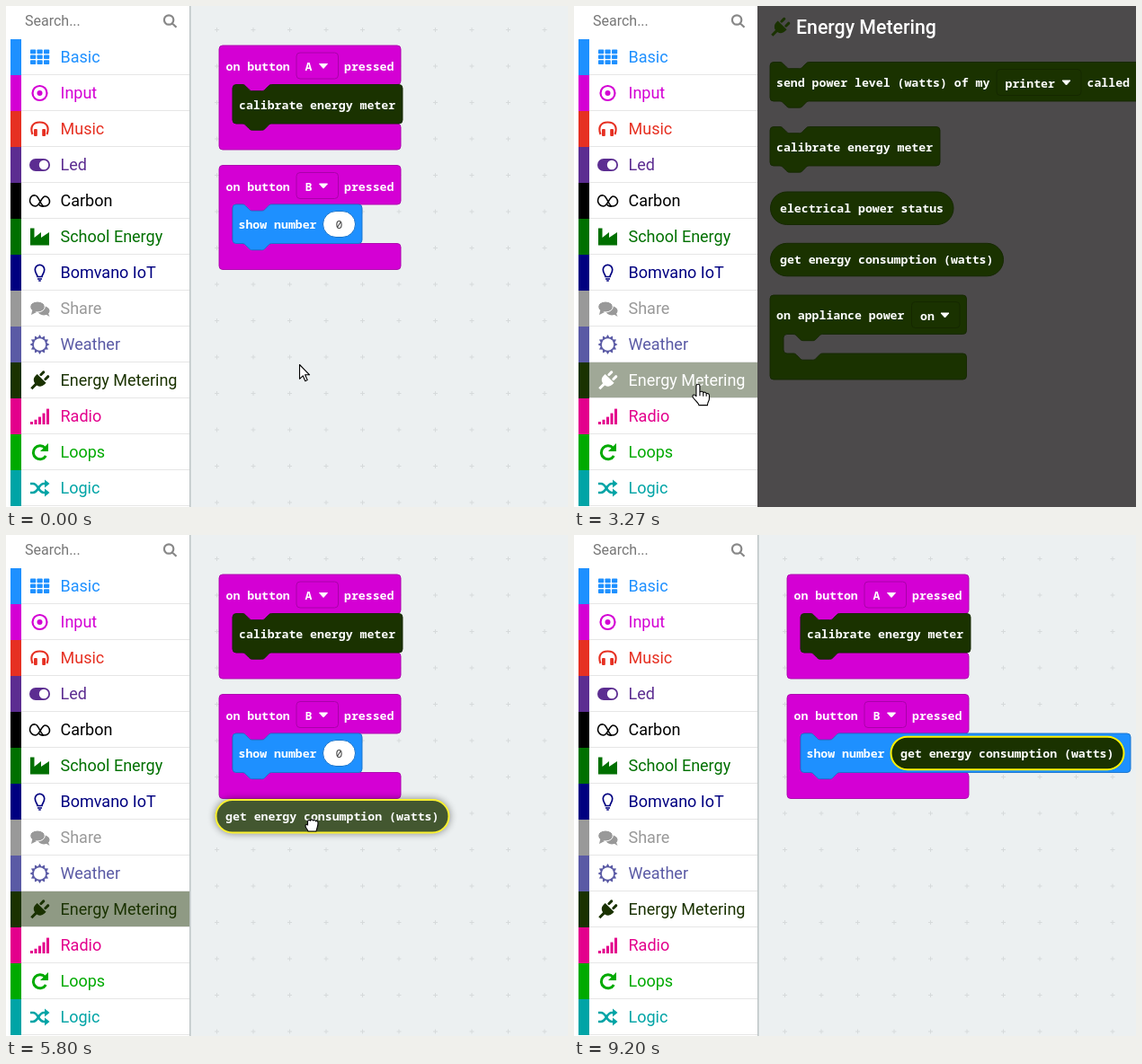
Write an HTML page that moves like this. It is 625 by 558 pixels and loops after 9.74 s.

```html
<!DOCTYPE html>
<html lang="en">
<head>
<meta charset="utf-8">
<title>Block editor</title>
<style>
  html, body { margin: 0; width: 100%; height: 100%; overflow: hidden; background: #ecf0f1; }
  svg { display: block; width: 625px; height: 558px; }
  text { font-family: Roboto, sans-serif; white-space: pre; }
  .code { font: bold 13.2px "Noto Sans Mono", monospace; fill: #fff; }
  .row { font-size: 18px; fill: currentColor; }
  .line { fill: none; stroke: currentColor; }
  .tip { font: 11.25px "Open Sans", sans-serif; fill: #777; }
  .cursor path { fill: #fff; stroke: #000; stroke-width: 1.1; stroke-linejoin: round; }
  #drag { opacity: .8; filter: drop-shadow(0 0 4px rgba(0, 0, 0, .55)); }
</style>
</head>
<body>
<svg id="stage" viewBox="0 0 625 558"></svg>
<script>
const LOOP = 9740, FRAME = 1000 / 15;
const MAGENTA = ['#d400d4', '#aa00aa'], BLUE = ['#1e90ff', '#1873cc'], GREEN = ['#1a3200', '#152800'];
const YELLOW = '#fff200';
const BAR = 43.5;

// Block shapes
const notch = d => `c${1.8 * d},0 ${2.7 * d},.9 ${3.6 * d},1.8l${3.6 * d},3.6` +
  `c${.9 * d},.9 ${1.8 * d},1.8 ${3.6 * d},1.8h${10.8 * d}` +
  `c${1.8 * d},0 ${2.7 * d},-.9 ${3.6 * d},-1.8l${3.6 * d},-3.6` +
  `c${.9 * d},-.9 ${1.8 * d},-1.8 ${3.6 * d},-1.8`;
const arc = (x, y, sweep = 1) => `a4,4 0 0 ${sweep} ${x},${y}`;
const shape = (d, [fill, edge]) => `<path d="${d}" fill="${fill}" stroke="${edge}" stroke-width=".9"/>`;

const statement = (x, y, w, color) => shape(
  `M${x},${y + 4}${arc(4, -4)}h7${notch(1)}H${x + w - 4}${arc(4, 4)}v${BAR - 8}${arc(-4, 4)}` +
  `H${x + 43.4}${notch(-1)}h-7${arc(-4, -4)}z`, color);

const hat = (x, y, w, slot, color) => shape(
  `M${x},${y + 4}${arc(4, -4)}H${x + w - 4}${arc(4, 4)}v${BAR - 8}${arc(-4, 4)}` +
  `H${x + 58.4}${notch(-1)}h-7${arc(-4, 4, 0)}v${slot - 8}${arc(4, 4, 0)}h7${notch(1)}` +
  `H${x + w - 4}${arc(4, 4)}v21${arc(-4, 4)}H${x + 4}${arc(-4, -4)}z`, color);

const code = (x, y, text) => `<text class="code" x="${x}" y="${y}">${text}</text>`;

const dropdown = (x, y, w, text, [fill, edge]) =>
  `<rect x="${x}" y="${y}" width="${w}" height="29" rx="4" fill="${fill}" stroke="${edge}"/>` +
  code(x + 9.5, y + 20, text) +
  `<path d="M${x + w - 21},${y + 12.5}h9l-4.5,5z" fill="#fff" stroke="#fff" stroke-linejoin="round"/>`;

const pill = (x, y, w, text, selected) =>
  `<rect x="${x}" y="${y}" width="${w}" height="36.5" rx="18.25" fill="${GREEN[0]}"
    stroke="${selected ? YELLOW : GREEN[1]}" stroke-width="${selected ? 2 : 1}"/>` +
  code(x + 10.5, y + 23, text);

const meterPill = (x, y) => pill(x, y, 259, 'get energy consumption (watts)', true);

const buttonHat = (y, name) => hat(237, y, 202, BAR, MAGENTA) + code(244.5, y + 28, 'on button') +
  dropdown(323, y + 8, 46.5, name, MAGENTA) + code(376, y + 28, 'pressed');

// Icons, drawn around 0,0
const bar = (x, y, w, h, extra = '') => `<rect x="${x}" y="${y}" width="${w}" height="${h}" ${extra}/>`;
const solid = d => `<path d="${d}"/>`;
const line = (d, w) => `<path class="line" stroke-width="${w}" d="${d}"/>`;
const times = (n, fn) => Array.from({ length: n }, (_, i) => fn(i)).join('');
const star = times(24, i => {
  const r = i % 2 ? 8 : 11, a = i * Math.PI / 12;
  return `${i ? 'L' : 'M'}${(r * Math.sin(a)).toFixed(2)},${(-r * Math.cos(a)).toFixed(2)}`;
}) + 'z';

const icons = {
  grid: times(9, i => bar(-10.5 + 7.5 * (i % 3), -8.5 + 5.9 * Math.floor(i / 3), 6.2, 4.7, 'rx=".8"')),
  target: '<circle class="line" r="8" stroke-width="2.2"/><circle r="3"/>',
  headphones: line('M-8,6C-11,-2 -8,-7.5 0,-7.5S11,-2 8,6', 2.2) +
    bar(-6.5, 0, 3.8, 8, 'rx="1"') + bar(2.7, 0, 3.8, 8, 'rx="1"'),
  toggle: bar(-11.5, -7, 23, 14, 'rx="7"') + '<circle cx="4.5" r="5.2" fill="#fff"/>',
  loop: line('M-5,-6C-9,-7 -11,-3 -11,0S-8,6 -5,6C0,6 2,-5 6,-5C9,-5 11,-2 11,1S8,6 5,6C1,6 -1,-6 -5,-6M-1,4C1,7 3,6 5,6', 1.6),
  factory: solid('M-10.5,9.5V-9.5h4.5V1l7.5,-6v6l9,-6v14.5z'),
  bulb: line('M-2.5,4.5C-2.5,2 -5.2,1 -5.2,-3.5a5.2,5.2 0 0 1 10.4,0C5.2,1 2.5,2 2.5,4.5zM-2.5,7h5M-1.3,9h2.6', 1.7),
  chat: '<ellipse cx="4.5" cy="2.5" rx="6.5" ry="5"/>' + solid('M6,6l5,3l-2,-5z') +
    '<ellipse cx="-2.5" cy="-2" rx="8.3" ry="6" stroke="#fff"/>' + solid('M-8,1l-1.5,6l6,-3z'),
  sun: solid(star) + '<circle r="6.7" fill="#fff"/>',
  plug: '<g transform="rotate(45)">' + solid('M-7,-3h14v2.5a7,7 0 0 1 -5.5,6.7V13h-3V6.2A7,7 0 0 1 -7,-.5z') +
    bar(-5, -11, 3, 7, 'rx="1.3"') + bar(2, -11, 3, 7, 'rx="1.3"') + '</g>',
  signal: times(5, i => { const h = 3 + .9 * i * (i + 4) / 2; return bar(-10.5 + 4.5 * i, 9 - h, 3, h); }),
  redo: line('M6,-4.6A7.5,7.5 0 1 0 6.8,4', 3) + solid('M9.5,-10v9h-9z'),
  shuffle: line('M-10.5,-5h3c6,0 6,10 12,10h3M-10.5,5h3c6,0 6,-10 12,-10h3', 2.6) +
    solid('M5.5,-9.5l5.5,4.5l-5.5,4.5zM5.5,.5l5.5,4.5l-5.5,4.5z')
};

// Toolbox
const rows = [
  ['Basic', '#1e90ff', 'grid'], ['Input', '#d400d4', 'target'], ['Music', '#e63022', 'headphones'],
  ['Led', '#5c2d91', 'toggle'], ['Carbon', '#000000', 'loop'], ['School Energy', '#007000', 'factory'],
  ['Bomvano IoT', '#000080', 'bulb'], ['Share', '#999999', 'chat'], ['Weather', '#5a5aa5', 'sun'],
  ['Energy Metering', '#1a3200', 'plug'], ['Radio', '#e3008c', 'signal'], ['Loops', '#00aa00', 'redo'],
  ['Logic', '#00a4a6', 'shuffle']
];
const row = ([name, color, icon], i) => {
  const y = 37 + 40 * i, id = name.split(' ')[0].toLowerCase();
  return bar(5, y, 12, 40, `fill="${color}"`) + bar(17, y, 187, 40, `id="${id}Back" fill="#fff"`) +
    bar(17, y + 39, 187, 1, 'fill="#e6e6e6"') +
    `<g id="${id}Row" color="${color}" fill="currentColor"><g transform="translate(37.5,${y + 20})">${icons[icon]}</g>
      <text class="row" x="60.5" y="${y + 26}">${name}</text></g>`;
};
const toolbox = bar(0, 0, 204, 558, 'fill="#fff"') + bar(204, 0, 1.5, 558, 'fill="#bcc4c5"') +
  '<text x="21" y="22" font-size="16" fill="#777">Search...</text>' +
  `<g color="#888">${line('M186.3,15.5a5.2,5.2 0 1 1 -10.4,0a5.2,5.2 0 1 1 10.4,0M185,19.5l4.5,4.3', 2.2)}</g>` +
  rows.map(row).join('');

const workspace = `<defs><pattern id="grid" x="214.25" y="6.25" width="40.5" height="40.5" patternUnits="userSpaceOnUse">
    <path d="M17.75,20.25h5M20.25,17.75v5" stroke="#d6dadb"/></pattern></defs>` +
  bar(0, 0, 625, 558, 'fill="#ecf0f1"') + bar(205, 0, 420, 558, 'fill="url(#grid)"') +
  buttonHat(44, 'A') + statement(252, 87.5, 189, GREEN) + code(259, 115, 'calibrate energy meter') +
  buttonHat(177.5, 'B') +
  `<g id="empty">${statement(252, 221, 144, BLUE)}${code(258.5, 248, 'show number')}
    <rect id="slot" x="352.5" y="228.5" width="36" height="29" rx="14.5" fill="#fff" stroke="${BLUE[1]}"/>
    <text x="366.5" y="248" style="font:13.2px 'Noto Sans Mono',monospace" fill="#444">0</text></g>` +
  `<g id="filled">${statement(252, 221, 367, BLUE)}${code(258.5, 248, 'show number')}${meterPill(352.5, 224.7)}</g>`;

const flyout = `<g id="flyout">` + bar(204, 0, 421, 558, 'fill="#4c4a4b"') +
  `<g fill="${GREEN[0]}" transform="translate(229.5,23.5)">${icons.plug}</g>` +
  '<text x="247" y="31" font-size="21.3" font-weight="500" fill="#fff">Energy Metering</text>' +
  statement(218, 62.5, 460, GREEN) + code(225, 90, 'send power level (watts) of my') +
  dropdown(470, 70.5, 94, 'printer', GREEN) + code(570.5, 90, 'called') +
  statement(218, 134.5, 189, GREEN) + code(225, 162, 'calibrate energy meter') +
  pill(218.5, 207, 203.5, 'electrical power status') +
  `<g id="idle">${pill(218.5, 264.3, 259, 'get energy consumption (watts)')}</g>` +
  `<g id="hovered">${meterPill(218.5, 264.3)}</g>` +
  hat(218, 322, 218.5, 21.5, GREEN) + code(225, 349, 'on appliance power') +
  dropdown(375.5, 329.5, 53.5, 'on', GREEN) + '</g>';

const tooltip = `<g id="tooltip">${bar(348, 269.5, 300, 69.5, 'rx="5" fill="#fff"')}
  <text class="tip" x="362" y="299">Scroll a number on the screen. If the number fits</text>
  <text class="tip" x="362" y="321">on the screen (i.e. is a single digit), do not scroll.</text></g>`;

const cursors = {
  arrow: 'M.5,.5V16.3L4.2,12.8L6.8,18.7L9.2,17.6L6.6,11.8H11.6Z',
  hand: 'M-2,2C-2,-.6 2,-.6 2,2V9C3,7.6 5.5,8 5.8,9.5C7,8.4 9,9 9.2,10.6C10.5,9.8 12.5,10.8 12.5,12.5V16' +
    'C12.5,19 10.5,20 10.5,23.5H1C1,21 -6,16 -6,13.5C-6,11.3 -3.5,11.3 -2,13.5ZM2,9v4M5.8,9.5v4M9.2,10.6v3',
  open: 'M-4,8.5C-5,5 -8,2 -8,0C-8,-2 -5.5,-1.5 -4.3,1L-5.5,-5C-5.8,-7.5 -3.3,-8 -2.8,-5.5L-2,-2V-7.5' +
    'C-2,-9.5 .8,-9.5 .8,-7.5V-2L1.8,-6.5C2.3,-8.5 4.8,-8 4.4,-6L3.8,-1L5.2,-4C6,-5.8 8.2,-5 7.6,-3C6.5,1 6.5,4 5,8.5Z',
  fist: 'M-4,7.5C-4,6 -7,4 -7,1.5C-7,0 -5.5,-.5 -4.5,.5V-3C-4.5,-5.5 -2,-5.5 -1.6,-4.2C-1.2,-6 1.3,-6 1.7,-4.4' +
    'C2.3,-5.6 4.2,-5.2 4.4,-3.6C5.4,-4.4 7,-3.6 7,-2C7,3 5.5,4 5,7.5Z'
};

const stage = document.getElementById('stage');
stage.innerHTML = workspace + toolbox + flyout + `<g id="drag">${meterPill(0, 0)}</g>` + tooltip +
  Object.entries(cursors).map(([id, d]) => `<g class="cursor" id="${id}"><path d="${d}"/></g>`).join('');

// Timeline: each key is [time, ...values]
const pointerPath = [
  [1130, 326, 399], [1500, 268, 409], [1800, 170, 419], [2130, 105, 421], [2400, 118, 421], [2800, 133, 421.5],
  [3200, 133, 421.5], [3700, 170, 419], [3930, 197, 417], [4200, 285, 325], [4400, 326, 288],
  [5270, 326, 288], [5800, 340, 322.5], [6050, 342, 305], [6400, 343.5, 260], [6530, 345, 256],
  [7930, 345, 256], [8270, 270, 345], [8600, 160, 455], [8930, 101, 530], [9200, 99, 562]
];
const pointerKinds = [
  [0, 'arrow'], [1730, 'hand'], [3990, 'arrow'], [4260, 'open'], [5130, 'fist'],
  [6730, 'open'], [8130, 'arrow'], [8460, 'hand'], [9190, '']
];
const dragPath = [[5270, 218.5, 264.3], [5800, 233.5, 295], [6050, 233.5, 281], [6400, 232.5, 239], [6530, 233.5, 236.5]];
const energyFill = [
  [1730, 255, 255, 255], [2700, 228, 228, 228], [2930, 228, 228, 228], [3930, 26, 50, 0],
  [5270, 26, 50, 0], [5800, 143, 154, 132], [6400, 253, 252, 249], [6530, 255, 255, 255]
];
const logicFill = [[8800, 255, 255, 255], [9000, 246, 246, 246], [9200, 255, 255, 255]];

function track(keys, t) {
  const next = keys.findIndex(key => key[0] > t);
  if (next < 1) return keys.at(next).slice(1);
  const a = keys[next - 1], b = keys[next], p = (t - a[0]) / (b[0] - a[0]);
  return a.slice(1).map((v, i) => v + (b[i + 1] - v) * p);
}
const el = id => document.getElementById(id);
const show = (id, on) => el(id).setAttribute('visibility', on ? 'visible' : 'hidden');
const place = (id, [x, y]) => el(id).setAttribute('transform', `translate(${x},${y})`);
const paint = (id, rgb) => el(id).setAttribute('fill', `rgb(${rgb.map(Math.round)})`);

function render(time) {
  const t = Math.floor((time + 5) / FRAME) * FRAME;
  const within = (from, to) => t >= from && t < to;

  const flyoutOpen = within(3060, 5330), hovered = t >= 4260;
  show('flyout', flyoutOpen);
  show('idle', flyoutOpen && !hovered);
  show('hovered', flyoutOpen && hovered);
  paint('energyBack', track(energyFill, t));
  paint('logicBack', track(logicFill, t));
  el('energyRow').setAttribute('color', flyoutOpen ? '#fff' : GREEN[0]);

  show('drag', within(5330, 6730));
  place('drag', track(dragPath, t));
  const targeted = within(6190, 6730);
  el('slot').setAttribute('stroke', targeted ? YELLOW : BLUE[1]);
  el('slot').setAttribute('stroke-width', targeted ? 4 : 1);
  show('empty', t < 6730);
  show('filled', t >= 6730);
  show('tooltip', within(7530, 8060));

  const kind = pointerKinds.findLast(key => key[0] <= t)[1];
  const point = track(pointerPath, t);
  for (const id in cursors) {
    show(id, id === kind);
    place(id, point);
  }
}

const start = performance.now();
function tick() {
  render((performance.now() - start) % LOOP);
  requestAnimationFrame(tick);
}
tick();
</script>
</body>
</html>
```
